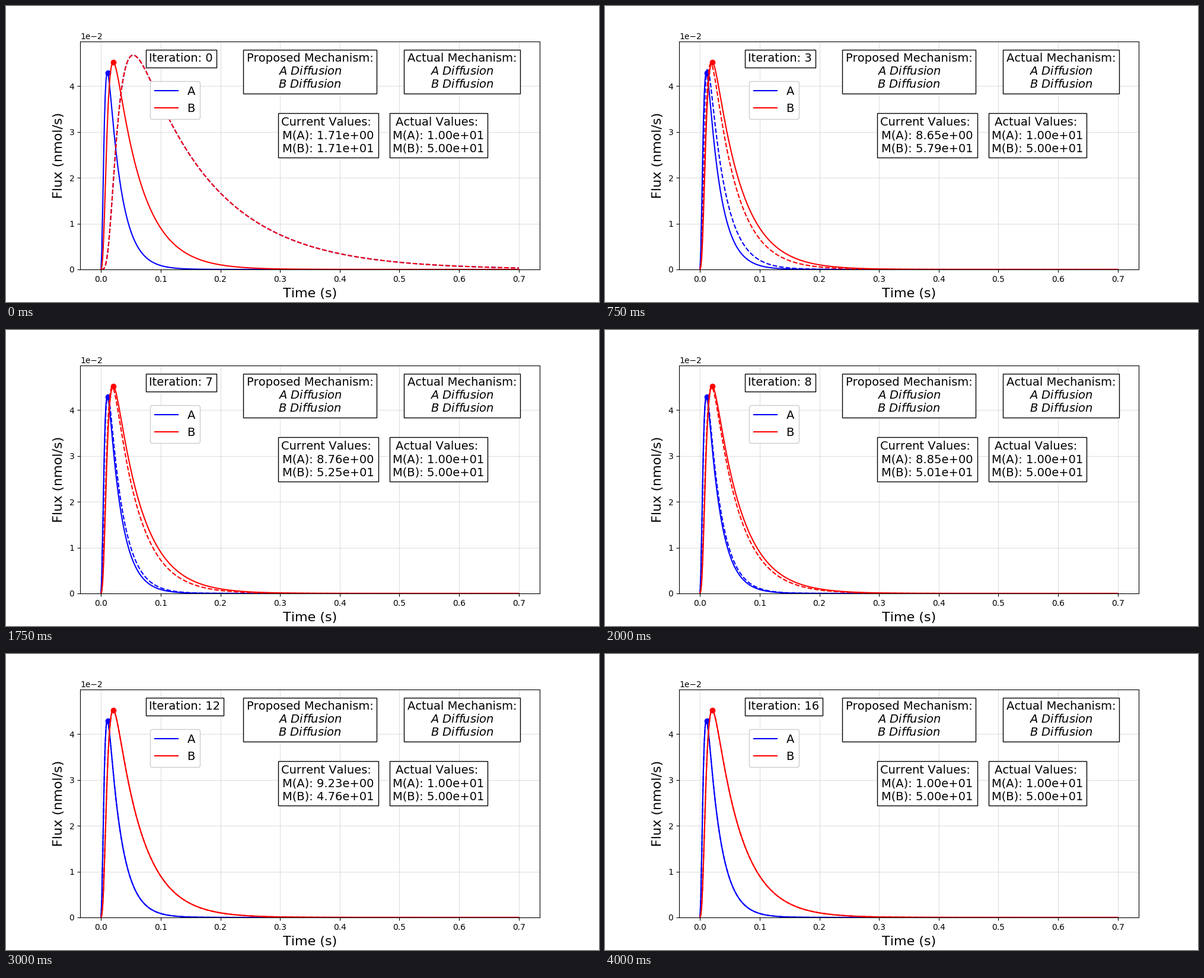
Animation, 1000 px wide and 500 px high, one loop 7 s. Source, as a matplotlib script:

```python
import numpy as np
import matplotlib.pyplot as plt
from matplotlib.animation import FuncAnimation

plt.rcParams["font.family"] = "DejaVu Sans"
plt.rcParams["text.kerning_factor"] = 6

STEP_MS = 250
FRAMES = 28
LAST = 16
STEPS = 500
T_END = 0.7
DT = T_END / STEPS
SCALE = 0.0809
START_RATE = 7.9

time = np.linspace(0, T_END, STEPS + 1)

# Displayed parameters at a few iterations of the fit
KEYS = (0, 3, 5, 7, 10, 13, LAST)
MASS_A = (1.71, 8.65, 8.66, 8.76, 9.02, 9.33, 10)
MASS_B = (17.1, 57.9, 57.4, 52.5, 45.3, 48.7, 50)


def flux(rate):
    """Outlet flux of a diffusing pulse, stepped with implicit Euler."""
    k = np.arange(200)
    odd = 2 * k + 1
    weight = odd * (-1.0) ** k
    weight[-1] /= 2
    growth = np.log1p(np.expm1(rate * DT) * odd**2)
    n = np.arange(1, STEPS + 1)
    return np.r_[0, SCALE * np.exp(-np.outer(n, growth)) @ weight]


def values_text(title, a, b):
    return f"{title} Values: \nM(A): {a:.2e}\nM(B): {b:.2e}"


def mechanism_text(title):
    return (f"{title} Mechanism:\n"
            r"$\mathit{A\ Diffusion}$" "\n" r"$\mathit{B\ Diffusion}$")


fig, ax = plt.subplots(figsize=(10, 5), dpi=100)
ax.grid(alpha=0.4)
ax.set_xlabel("Time (s)", fontsize=16, labelpad=5)
ax.set_ylabel("Flux (nmol/s)", fontsize=16, labelpad=5)
ax.ticklabel_format(axis="y", style="sci", scilimits=(0, 0))


def box(x, y, text, ha):
    return ax.text(x, y, text, transform=ax.transAxes, fontsize=14,
                   ha=ha, va="top", multialignment="center",
                   bbox=dict(boxstyle="square,pad=0.293", fc="white", ec="black", lw=1))


# Each fit jumps close to its curve, then settles on it
fits = []
top = 0
for name, color, rate, jump, drift in (("A", "b", 45.5, 36.9, 39.5),
                                       ("B", "r", 21.95, 25, 25.5)):
    y = flux(rate)
    peak = y.argmax()
    top = max(top, y[peak])
    ax.plot(time, y, color=color, label=name)
    fit, = ax.plot(time, y, color=color, ls="--")
    ax.plot(time[peak], y[peak], "o", color=color)
    fits.append((fit, (START_RATE, jump, drift, rate)))

ax.set_xlim(-0.05 * T_END, 1.05 * T_END)
ax.set_ylim(0, 1.1 * top)
ax.legend(loc="upper left", bbox_to_anchor=(0.14, 0.85), fontsize=14, framealpha=1)

counter = box(0.15, 0.95, "Iteration: 0", "left")
box(0.5, 0.95, mechanism_text("Proposed"), "center")
box(0.95, 0.95, mechanism_text("Actual"), "right")
current = box(0.54, 0.67, "", "center")
box(0.78, 0.67, values_text("Actual", 10, 50), "center")


def draw(frame):
    i = min(frame, LAST)
    for fit, rates in fits:
        fit.set_ydata(flux(np.interp(i, (0, 3, 5, 10), rates)))
    counter.set_text(f"Iteration: {i}")
    a, b = (np.interp(i, KEYS, mass) for mass in (MASS_A, MASS_B))
    current.set_text(values_text("Current", a, b))
    return [*(fit for fit, _ in fits), counter, current]


anim = FuncAnimation(fig, draw, frames=FRAMES, interval=STEP_MS, repeat=True, repeat_delay=0)
plt.show()
```
